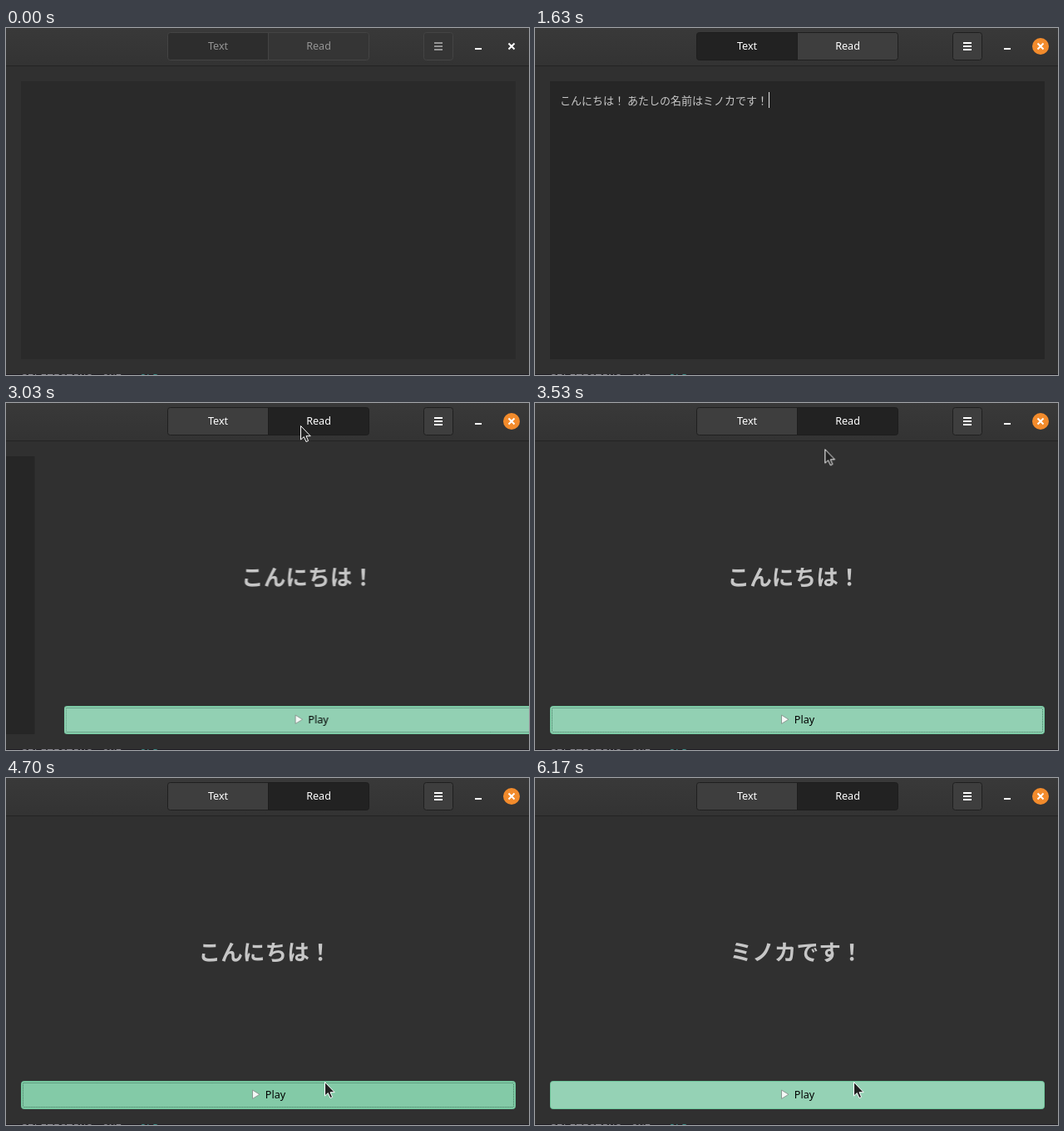
Animation of 629 by 417 pixels, one loop 6.2 s. Source, as an HTML page:

```html
<!DOCTYPE html>
<html lang="ja">
<head>
<meta charset="utf-8">
<title>Reader</title>
<style>
html, body { margin: 0; width: 100%; height: 100%; overflow: hidden; background: #303030; }
svg { display: block; width: 629px; height: 417px; }
text { font: 12.6px "Noto Sans", "Open Sans", sans-serif; }
.mid { text-anchor: middle; }
.ja { font: 13px "Noto Sans CJK JP", "Noto Sans CJK", sans-serif; fill: #c8c8c8; }
.word { font: bold 26.67px "Noto Sans CJK JP", "Noto Sans CJK", sans-serif; fill: #c6c6c6; text-anchor: middle; }
.term { font: 13px "Noto Sans Mono", monospace; }

/* every animation shares one 6200 ms clock */
.a { animation: 6200ms linear infinite; }
.s { animation: 6200ms step-end infinite; }

/* window gains focus */
.focus { animation-name: focus; }
@keyframes focus {
  0%, 16.61% { fill: var(--off); stroke: var(--line-off, none); }
  19.35%, 100% { fill: var(--on); stroke: var(--line-on, none); }
}
.label { --off: #959595; --on: #fff; }
.btn { --off: #353535; --on: #3e3e3e; --line-off: #444; --line-on: #1f1f1f; }
.area { --off: #2a2a2a; --on: #262626; }
.glow { animation-name: glow; }
@keyframes glow { 0%, 16.61% { opacity: 0 } 19.35%, 100% { opacity: 1 } }

.tab-text { animation-name: tab-text; }
@keyframes tab-text {
  0%, 16.61% { fill: #2d2d2d; stroke: #444; }
  19.35%, 45.64% { fill: #222; stroke: #1d1d1d; }
  47.9%, 100% { fill: #3e3e3e; stroke: #1f1f1f; }
}
.tab-read { animation-name: tab-read; }
@keyframes tab-read {
  0%, 16.61% { fill: #353535; stroke: #444; }
  19.35%, 44.66% { fill: #3e3e3e; stroke: #1f1f1f; }
  44.67%, 45.64% { fill: #252525; stroke: #1d1d1d; }
  47.9%, 100% { fill: #222; stroke: #1d1d1d; }
}

/* page slide */
.page-text { animation-name: page-text; }
@keyframes page-text {
  0%, 46.11% { transform: translateX(0); animation-timing-function: cubic-bezier(.333, .667, .667, 1); }
  50%, 100% { transform: translateX(-630px); }
}
.page-read { animation-name: page-read; }
@keyframes page-read {
  0%, 46.11% { transform: translateX(630px); animation-timing-function: cubic-bezier(.333, .667, .667, 1); }
  50%, 100% { transform: translateX(0); }
}

.typed { animation-name: typed; }
@keyframes typed { 0% { opacity: 0 } 26.29% { opacity: 1 } 100% { opacity: 1 } }
.caret { animation-name: caret; }
@keyframes caret {
  0% { opacity: 0; transform: translateX(0); }
  16.61% { opacity: 1; transform: translateX(0); }
  26.29%, 100% { opacity: 1; transform: translateX(251px); }
}

/* words read one by one */
.w1 { animation-name: w1; }
.w2 { animation-name: w2; }
.w3 { animation-name: w3; }
.w4 { animation-name: w4; }
.w5 { animation-name: w5; }
@keyframes w1 { 0% { opacity: 1 } 81.12%, 100% { opacity: 0 } }
@keyframes w2 { 0% { opacity: 0 } 81.12% { opacity: 1 } 83.87%, 100% { opacity: 0 } }
@keyframes w3 { 0% { opacity: 0 } 83.87% { opacity: 1 } 87.09%, 100% { opacity: 0 } }
@keyframes w4 { 0% { opacity: 0 } 87.09% { opacity: 1 } 89.83%, 100% { opacity: 0 } }
@keyframes w5 { 0% { opacity: 0 } 89.83%, 100% { opacity: 1 } }

/* play button */
.play-bg { animation-name: play-bg; }
@keyframes play-bg {
  0%, 75.4% { fill: #92d0b3; }
  76.28%, 92.41% { fill: #73c39b; }
  95.16%, 100% { fill: #95d2b5; }
}
.dots { animation-name: dots; }
@keyframes dots { 0%, 98.4% { opacity: 1 } 99.5%, 100% { opacity: 0 } }
.play { animation-name: play; }
.pause { animation-name: pause; }
@keyframes play { 0% { opacity: 1 } 78.54% { opacity: 0 } 92.41%, 100% { opacity: 1 } }
@keyframes pause { 0% { opacity: 0 } 78.54% { opacity: 1 } 92.41%, 100% { opacity: 0 } }

/* pointer */
.pointer { animation-name: pointer; }
@keyframes pointer {
  0%, 5.4% { transform: translate(0, 112px); animation-timing-function: cubic-bezier(.4, 0, .5, 1); }
  11.29%, 26.29% { transform: translate(163px, 156px); }
  26.3%, 32.2% { transform: translate(175px, 147px); animation-timing-function: cubic-bezier(.35, .1, .5, 1); }
  39.83%, 54.8% { transform: translate(354px, 27px); animation-timing-function: ease-in; }
  57.25% { transform: translate(347px, 62px); }
  60% { transform: translate(351px, 205px); animation-timing-function: cubic-bezier(.25, .5, .5, 1); }
  64.51%, 66.6% { transform: translate(383px, 361px); }
  66.61%, 68.3% { transform: translate(383px, 362px); }
  70.96%, 100% { transform: translate(383px, 365px); }
}
.arrow { animation-name: arrow; }
.beam { animation-name: beam; }
@keyframes arrow {
  0% { opacity: 0 } 5.96% { opacity: 1 } 7.1% { opacity: 0 }
  36.55%, 100% { opacity: 1 }
}
@keyframes beam {
  0% { opacity: 0 } 7.1% { opacity: 1 } 26.29% { opacity: 0 }
  32.74% { opacity: 1 } 36.55%, 100% { opacity: 0 }
}
</style>
</head>
<body>
<svg viewBox="0 0 629 417">
  <defs>
    <linearGradient id="bar" x2="0" y2="1">
      <stop stop-color="#393939"/>
      <stop offset="1" stop-color="#333"/>
    </linearGradient>
  </defs>
  <rect width="629" height="417" fill="#303030"/>

  <g class="a page-text">
    <rect class="a focus area" x="18" y="64" width="595" height="334"/>
    <text class="s typed ja" x="30" y="92" xml:space="preserve">こんにちは！ あたしの名前はミノカです！</text>
    <rect class="s caret" x="30" y="77" width="1" height="19" fill="#e4e4e4"/>
  </g>

  <g class="a page-read">
    <text class="s w1 word" x="311.5" y="219">こんにちは！</text>
    <text class="s w2 word" x="314.5" y="219">あたしの</text>
    <text class="s w3 word" x="314.5" y="219">名前</text>
    <text class="s w4 word" x="314.5" y="219">は</text>
    <text class="s w5 word" x="314.5" y="219">ミノカです！</text>
    <rect class="a play-bg" x="18.5" y="364.5" width="594" height="33" rx="3" stroke="#6fc79c"/>
    <rect class="a dots" x="20.5" y="366.5" width="590" height="29" rx="1" fill="none" stroke="#3d7a5c" stroke-dasharray="1 1"/>
    <g class="s play">
      <path d="M296.5 375v10.5l8.5-5.25z" fill="#f4f8f6" stroke="#8a9a92"/>
      <text class="mid" x="324" y="385">Play</text>
    </g>
    <g class="s pause">
      <path d="M292 375h3.5v9H292zM297.5 375h3.5v9h-3.5z" fill="#f4f8f6"/>
      <text class="mid" x="324.5" y="385">Pause</text>
    </g>
  </g>

  <g>
    <rect width="629" height="45" fill="url(#bar)"/>
    <rect y="45" width="629" height="1" fill="#232323"/>
    <path class="a tab-text" d="M315.5 5.5H197.5a3 3 0 0 0-3 3v27a3 3 0 0 0 3 3H315.5z"/>
    <path class="a tab-read" d="M315.5 5.5H433.5a3 3 0 0 1 3 3v27a3 3 0 0 1-3 3H315.5z"/>
    <text class="a focus label mid" x="255" y="26">Text</text>
    <text class="a focus label mid" x="376" y="26">Read</text>
    <rect class="a focus btn" x="502.5" y="5.5" width="35" height="33" rx="3"/>
    <path class="a focus label" d="M515 17h10v2h-10zM515 21h10v2h-10zM515 25h10v2h-10z"/>
    <rect x="564" y="24" width="8" height="2" fill="#fff"/>
    <circle class="a glow" cx="608" cy="22" r="10" fill="#f28b2c"/>
    <path d="M604.5 18.5l7 7m0-7l-7 7" stroke="#fff" stroke-width="2"/>
  </g>

  <rect y="416" width="629" height="1" fill="#1f1d24"/>
  <g class="term">
    <text class="term" x="18" y="424.5" fill="#85838c">SELFTESTING</text>
    <text class="term" x="116" y="424.5" fill="#85838c">ONE</text>
    <text class="term" x="161" y="424.5" fill="#3f8f8a">OLD</text>
  </g>

  <g class="a pointer">
    <path class="s arrow" d="M.5.5V17l3.8-3.4 2.7 6 2.6-1.2-2.6-5.7h5.2z" fill="#222" stroke="#fff"/>
    <g class="s beam" fill="none">
      <path d="M-3.5-8H-1.5L0-7 1.5-8H3.5M0-7V7M-3.5 8H-1.5L0 7 1.5 8H3.5" stroke="#fff" stroke-width="3"/>
      <path d="M-3.5-8H-1.5L0-7 1.5-8H3.5M0-7V7M-3.5 8H-1.5L0 7 1.5 8H3.5" stroke="#222"/>
    </g>
  </g>
</svg>
</body>
</html>
```
